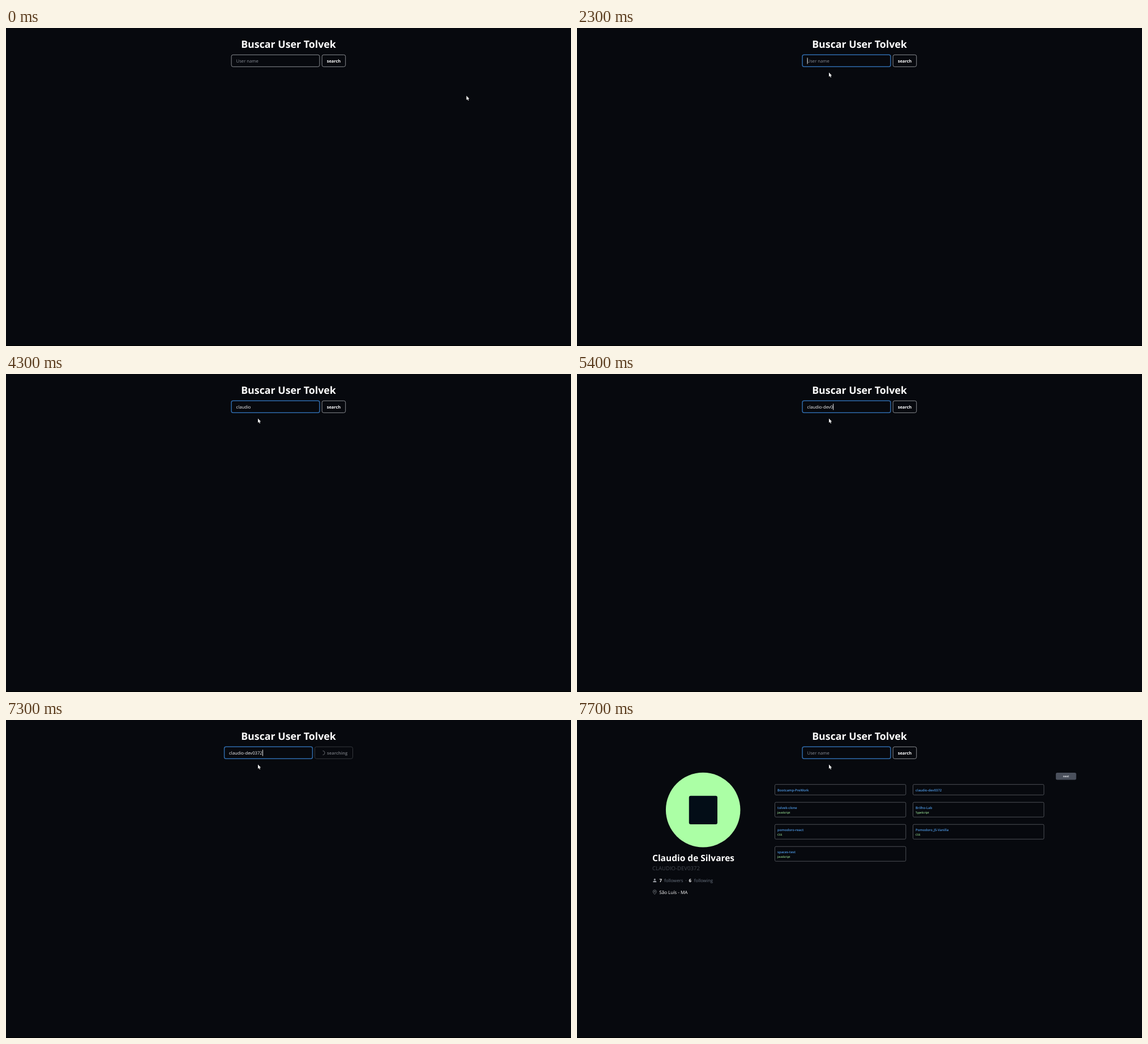
An HTML page for the animation above (8000 ms loop, 998 px wide and 561 px high).

```html
<!DOCTYPE html>
<html lang="pt">
<head>
<meta charset="utf-8">
<title>Buscar User</title>
<style>
  html, body { margin: 0; width: 100%; height: 100%; overflow: hidden; background: #07090e; }
  svg { display: block; width: 998px; height: 561px; font-family: "Open Sans", "Noto Sans", sans-serif; fill: #fff; text-rendering: geometricPrecision; }
  .b { font-weight: 700; }
  .mid { text-anchor: middle; }
  .line { fill: none; stroke: #898c91; }
  .dim { fill: #6b7482; }
  .card { fill: none; stroke: #55585e; stroke-width: .9; }
  .repo { fill: #4f9be8; font-size: 5.9px; font-weight: 600; }
  .lang { fill: #a0eb9c; font-size: 4.7px; font-weight: 600; }
</style>
</head>
<body>
<svg viewBox="0 0 998 561">
  <rect y="560" width="998" height="1" fill="#000"/>
  <text class="b mid" x="499" y="35" font-size="17.8">Buscar User Tolvek</text>

  <g id="field">
    <rect id="box" class="line" x="398.1" y="47.3" width="155.8" height="21" rx="3"/>
    <text id="input" x="406.6" y="61" font-size="7.7" font-weight="500" xml:space="preserve"></text>
    <rect id="caret" y="52.5" width=".9" height="11"/>
  </g>

  <g id="search">
    <rect class="line" x="558.2" y="47.3" width="41.5" height="21" rx="3"/>
    <text class="b mid" x="579" y="61" font-size="7.4">search</text>
  </g>
  <g id="busy">
    <rect class="line" x="545.5" y="47.3" width="67" height="21" rx="3" style="stroke:#34373c"/>
    <text class="b" x="567" y="61" font-size="7.5" fill="#63666c">searching</text>
    <path id="spin" d="M559.5 54.4a3.6 3.6 0 0 1 0 7.2" fill="none" stroke="#63666c"/>
  </g>

  <g id="profile">
    <g id="avatar">
      <circle cx="269.5" cy="158.6" r="65.8" fill="#abffa5"/>
      <rect x="244.6" y="133.7" width="50.2" height="50.2" rx="3" fill="#030d17"/>
    </g>
    <text class="b" x="133" y="249" font-size="15.5">Claudio de Silvares</text>
    <text x="133" y="265" font-size="9.55" fill="#444850">CLAUDIO-DEV0372</text>
    <g fill="#969aa1">
      <circle cx="137.3" cy="281.3" r="1.5"/>
      <path d="M134.4 286.2v-1q0-1.8 2.9-1.8t2.9 1.8v1z"/>
    </g>
    <g font-size="7.9">
      <text class="b" x="145.4" y="286.3">7</text>
      <text class="dim" x="154" y="286.3">followers</text>
      <text class="dim" x="191.5" y="286.3">·</text>
      <text class="b" x="197.5" y="286.3">6</text>
      <text class="dim" x="206.8" y="286.3">following</text>
      <text x="145.2" y="307.1" font-size="8.1" font-weight="500">São Luís - MA</text>
    </g>
    <g fill="none" stroke="#777b82" stroke-width=".8">
      <path d="M137.2 307.6q-3-2.8-3-4.8a3 3 0 0 1 6 0q0 2-3 4.8z"/>
      <circle cx="137.2" cy="302.8" r="1"/>
    </g>
    <rect id="next" y="93" height="12.4" rx="2.5" fill="#4a505c"/>
    <text id="nextText" class="b mid" y="100.9" font-size="4.7" fill="#e8eaee">next</text>
  </g>
  <g id="repos"></g>
  <path id="arrow" d="M0 0v7.4l1.7-1.4 1.2 2.6 1.3-.6-1.2-2.5h2.2z" fill="#eee"/>
</svg>
<script>
const el = id => document.getElementById(id);
const show = (id, on) => el(id).style.display = on ? '' : 'none';
const set = (id, name, value) => el(id).setAttribute(name, value);

const LOOP = 8000, FOCUS = 1300, BUSY = 6900, FOUND = 7600, LISTED = 7700;
const user = 'claudio-dev0372';
const keys = [2500, 2600, 2800, 3000, 3200, 3400, 3800, 4700, 4900, 4900, 5200, 5400, 5600, 5700, 5950];

const repos = [
  ['Bootcamp-PreWork'], [user],
  ['tolvek-clone', 'JavaScript'], ['Brilho-Lab', 'TypeScript'],
  ['pomodoro-react', 'CSS'], ['Pomodoro_JS-Vanilla', 'CSS'],
  ['spaces-test', 'JavaScript']
];
el('repos').innerHTML = repos.map(([name, lang], i) => {
  const row = i >> 1, x = i % 2 ? 593.5 : 349.5;
  const y = row ? 106.2 + 39 * row : 113.7;
  return `<rect class="card" x="${x}" y="${y}" width="231.3" height="${lang ? 26 : 18.5}" rx="2"/>
    <text class="repo" x="${x + 4.6}" y="${y + 11.9}">${name}</text>
    <text class="lang" x="${x + 4.6}" y="${y + 19.6}">${lang || ''}</text>`;
}).join('');

function pointer(t) {
  if (t < 900) {
    const k = Math.min(1, Math.max(0, (t - 450) / 400)), e = k * k * (3 - 2 * k);
    return [813.3 - 211.5 * e, 119.5 - 41 * e];
  }
  if (t < 2000) return null;             // text cursor over the field
  return t < 2100 ? [475, 75.5] : [445, 78.6];
}

function draw(time) {
  const t = Math.floor(time % LOOP / 100) * 100 + 50;   // ten pictures a second
  const busy = t >= BUSY && t < FOUND, found = t >= FOUND, listed = t >= LISTED;
  const typed = found ? 0 : keys.filter(k => k <= t).length;

  set('field', 'transform', `translate(${busy ? -12.5 : 0})`);
  el('box').style.stroke = t < 1200 ? '#898c91' : t < FOCUS ? '#5782a8' : '#2f6aa9';
  el('box').style.strokeWidth = t < FOCUS ? 1 : 1.5;
  el('input').textContent = typed ? user.slice(0, typed) : 'User name';
  set('input', 'fill', typed ? '#f4f5f7' : '#8a8f98');

  const since = t - (typed ? keys[typed - 1] : FOCUS);
  show('caret', t >= FOCUS && !found && since % 1000 <= 500);
  set('caret', 'x', typed ? 406.8 + el('input').getComputedTextLength() : 406.6);

  show('search', !busy);
  show('busy', busy);
  set('spin', 'transform', `rotate(${(t - 7350) * .8} 559.5 58)`);

  show('profile', found);
  show('repos', listed);
  set('avatar', 'transform', `translate(${listed ? -46.8 : 0})`);
  const left = listed ? 845.8 : 835.8;
  set('next', 'x', left);
  set('next', 'width', 881.8 - left);
  set('nextText', 'x', (left + 881.8) / 2);

  const p = pointer(t);
  show('arrow', p);
  if (p) set('arrow', 'transform', `translate(${p})`);
}

const start = performance.now();
function tick() {
  draw(performance.now() - start);
  requestAnimationFrame(tick);
}
tick();
</script>
</body>
</html>
```
